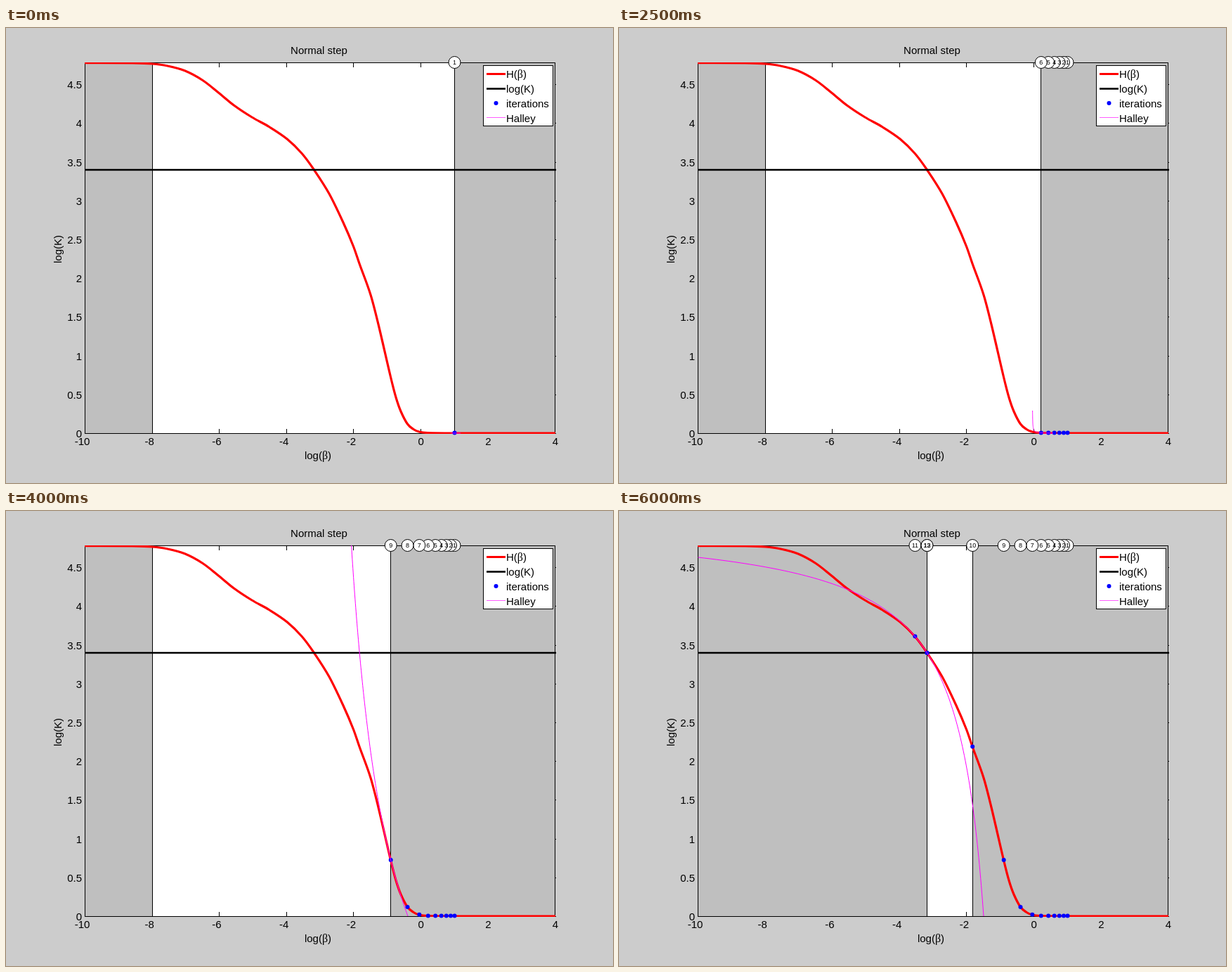
Animation of 864 by 648 pixels, one loop 6.5 s. Source, as an HTML page:

```html
<!DOCTYPE html>
<html lang="en">
<head>
<meta charset="utf-8">
<title>Normal step</title>
<style>
html, body { margin: 0; width: 100%; height: 100%; overflow: hidden; background: #ccc; }
svg { display: block; width: 864px; height: 648px; }
text { font: 15px "Liberation Sans", Arial, sans-serif; }
.beta { font: 16px "Liberation Serif", serif; }
.num text { font-size: 9px; text-anchor: middle; }
.num circle { fill: #fff; stroke: #000; }
.thin { fill: none; stroke: #000; stroke-width: 1; shape-rendering: crispEdges; }
.patch { fill: #bfbfbf; stroke: #000; shape-rendering: crispEdges; }
</style>
</head>
<body>
<svg id="stage" viewBox="0 0 864 648">
  <defs><clipPath id="box"><rect x="112" y="49" width="671" height="529"/></clipPath></defs>
  <rect width="864" height="648" fill="#ccc"/>
  <rect x="112" y="49" width="670" height="529" fill="#fff"/>
  <path id="ticks" class="thin"/>
  <rect id="left" class="patch"/>
  <rect id="right" class="patch"/>
  <rect class="thin" x="112.5" y="49.5" width="669" height="528"/>
  <g id="labels"></g>
  <g clip-path="url(#box)" fill="none">
    <path id="curve" stroke="#f00" stroke-width="3.2" stroke-linejoin="round"/>
    <path d="M112 202H783" stroke="#000" stroke-width="2.6"/>
  </g>
  <g id="dots" fill="#00f"></g>
  <path id="halley" clip-path="url(#box)" fill="none" stroke="#f0f" stroke-width="1"/>
  <rect class="thin" x="679.5" y="53.5" width="99" height="86" style="fill:#fff"/>
  <path d="M684 65.5H711" stroke="#f00" stroke-width="3"/>
  <path d="M684 86.5H711" stroke="#000" stroke-width="2.6"/>
  <circle cx="697.5" cy="107" r="3" fill="#00f"/>
  <path d="M684 127.5H711" stroke="#ff5cff"/>
  <text x="712" y="71">H(<tspan class="beta">β</tspan>)</text>
  <text x="712" y="92">log(K)</text>
  <text x="712" y="113">iterations</text>
  <text x="712" y="134">Halley</text>
  <text x="445.5" y="37" text-anchor="middle">Normal step</text>
  <text x="444" y="614" text-anchor="middle">log(<tspan class="beta">β</tspan>)</text>
  <text transform="translate(79 315) rotate(-90)" text-anchor="middle">log(K)</text>
  <g id="rings" class="num"></g>
  <g id="nums" class="num"></g>
</svg>
<script>
const $ = id => document.getElementById(id);
const TOP = 49, BASE = 577, LEFT = 112.5, GOAL = 202, STEP = 500;
const px = v => 590.6 + v * 47.857;
const py = v => BASE + 0.5 - v * 110.4;

function add(parent, tag, attrs, text) {
  const el = document.createElementNS("http://www.w3.org/2000/svg", tag);
  for (const k in attrs) el.setAttribute(k, attrs[k]);
  if (text !== undefined) el.textContent = text;
  return parent.appendChild(el);
}

// Axis ticks and labels
let ticks = "";
for (let v = -10; v <= 4; v += 2) {
  const x = Math.floor(px(v)) + 0.5;
  if (v > -10 && v < 4) ticks += `M${x} 578V571M${x} 49V56`;
  add($("labels"), "text", { x: px(v) - (v < 0 ? 3.5 : 0), y: 594, "text-anchor": "middle" }, v);
}
for (let v = 0; v < 4.6; v += 0.5) {
  const y = Math.floor(py(v)) + 0.5;
  ticks += `M112 ${y}H119M783 ${y}H775`;
  add($("labels"), "text", { x: 108, y: y + 5, "text-anchor": "end" }, v);
}
$("ticks").setAttribute("d", ticks);

// H curve: smooth path through a few points
const knots = [[112, 49.7], [180, 50], [208, 51], [230, 54], [255, 61], [280, 74.5], [303, 92.5],
  [325, 110.5], [350, 127], [375, 141], [400, 158], [421, 178.5], [438.5, 202], [460, 236],
  [480, 277], [494.5, 311], [503, 335.5], [519, 380], [530, 422], [547.5, 497], [555, 526],
  [562, 546], [571.5, 564], [580, 571.5], [588, 575], [600, 576.5], [640, 577], [782, 577]];
const slope = i => {
  const a = knots[Math.max(i - 1, 0)], b = knots[Math.min(i + 1, knots.length - 1)];
  return (b[1] - a[1]) / (b[0] - a[0]);
};
let d = "M" + knots[0];
for (let i = 1; i < knots.length; i++) {
  const [x0, y0] = knots[i - 1], [x1, y1] = knots[i], h = (x1 - x0) / 3;
  d += `C${x0 + h} ${y0 + h * slope(i - 1)} ${x1 - h} ${y1 - h * slope(i)} ${x1} ${y1}`;
}
$("curve").setAttribute("d", d);

// Iterates: x, y, where the hyperbola meets zero, its highest drawn y, its y at the left edge
const steps = [
  { x: 638.5, y: 576.99, end: 647, top: 576 },
  { x: 633, y: 576.98, end: 643, top: 575 },
  { x: 626.8, y: 576.97, end: 638, top: 574 },
  { x: 619.7, y: 576.95, end: 632, top: 572 },
  { x: 611.2, y: 576.9, end: 625, top: 370 },
  { x: 600.8, y: 576.5, end: 618, top: 545 },
  { x: 588.3, y: 574.8, end: 615, top: TOP },
  { x: 571.5, y: 564, end: 590, top: TOP },
  { x: 547.7, y: 497, end: 572, top: TOP },
  { x: 503.2, y: 335.5, end: 562, edge: 59 },
  { x: 421.4, y: 178.5, end: 507.5, edge: 84.5 },
  { x: 438.4, y: 202, end: 519.4, edge: 66.4 },
  { x: 438.5, y: 202, end: 519, edge: 66 }
];

// y = a + b / (x - p) through the iterate, its zero and one point to the left
function hyperbola(i) {
  const s = steps[i], far = s.edge !== undefined;
  const x1 = far ? LEFT : steps[i + 1].x, y1 = far ? s.edge : GOAL;
  const m1 = (s.y - y1) / (s.x - x1), m2 = (BASE - s.y) / (s.end - s.x), q = m1 / m2;
  const p = (q * x1 - s.end) / (q - 1);
  const b = -m1 * (x1 - p) * (s.x - p);
  const a = BASE - b / (s.end - p);
  const from = far ? LEFT - p : b / (s.top - a);
  const n = 120, pts = [];
  for (let k = 0; k <= n; k++) {
    const u = from * Math.pow((s.end - p) / from, k / n);
    pts.push((p + u).toFixed(2) + " " + (a + b / u).toFixed(2));
  }
  return "M" + pts.join("L");
}

const marks = steps.map((s, i) => [
  add($("dots"), "circle", { cx: s.x, cy: Math.min(s.y, 576.6), r: 3 }),
  add($("rings"), "circle", { cx: s.x, cy: 49, r: 8.5 }),
  add($("nums"), "text", { x: s.x, y: 52 }, i + 1)
]);
const paths = steps.map((s, i) => hyperbola(i));

function setPatch(el, x0, x1) {
  const a = Math.floor(x0) + 0.5, b = Math.floor(x1) + 0.5;
  const box = { x: a, y: 49.5, width: b - a, height: 528 };
  for (const k in box) el.setAttribute(k, box[k]);
}

let shown = -1;
function draw(t) {
  const n = Math.floor(t / STEP) % steps.length;
  if (n === shown) return;
  shown = n;
  let lo = 208, hi = 781;
  steps.forEach((s, i) => {
    for (const el of marks[i]) el.setAttribute("visibility", i <= n ? "visible" : "hidden");
    if (i > n) return;
    if (s.y > GOAL) hi = Math.min(hi, s.x);
    else lo = Math.max(lo, s.x);
  });
  setPatch($("left"), 112, lo);
  setPatch($("right"), hi, 781);
  $("halley").setAttribute("d", paths[n]);
}

const start = performance.now();
function tick() {
  draw(performance.now() - start);
  requestAnimationFrame(tick);
}
draw(0);
requestAnimationFrame(tick);
</script>
</body>
</html>
```
